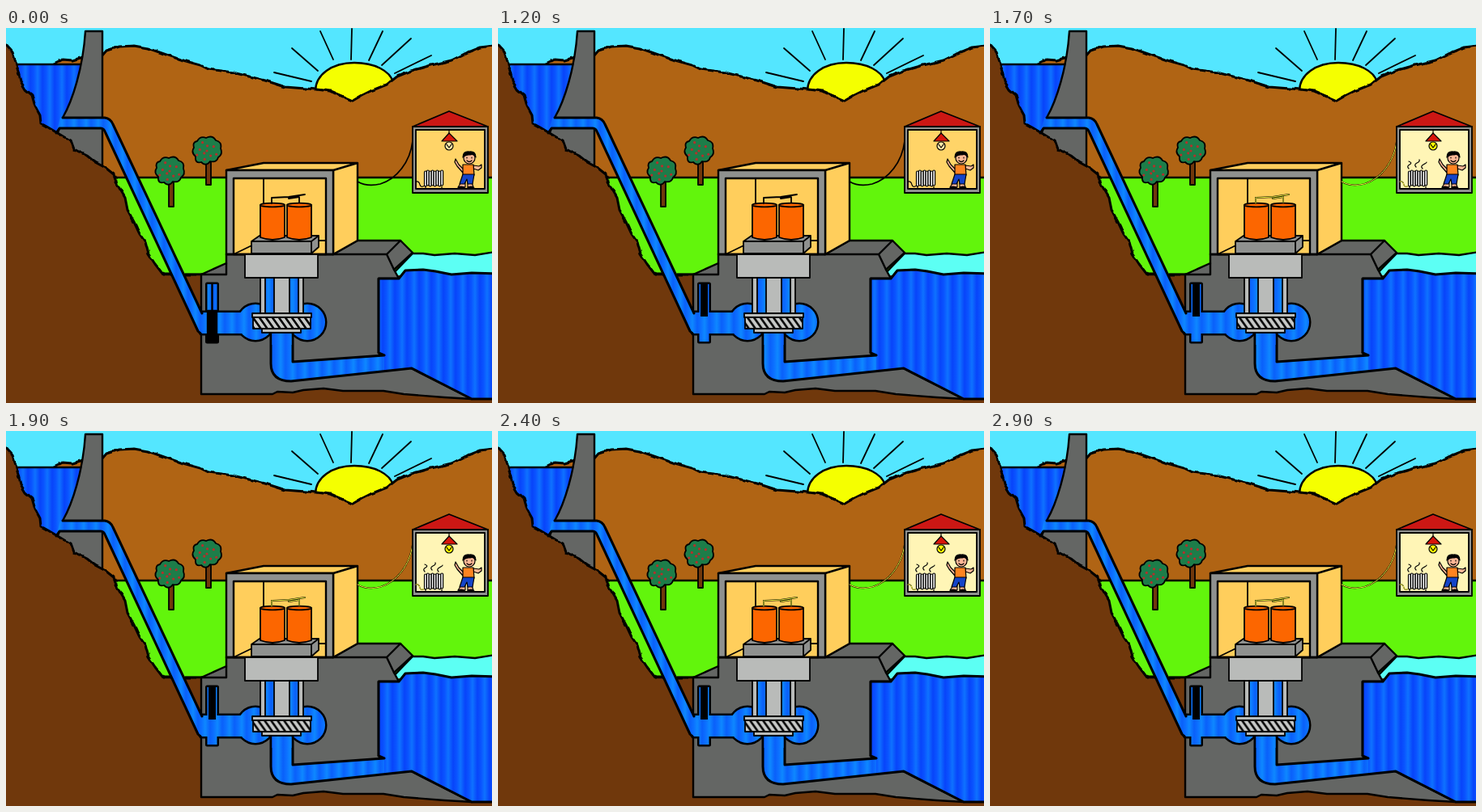
Recreate the animation shown at these times as an HTML page. Size 600x464 px, loop 3000 ms.

```html
<!DOCTYPE html>
<html lang="en">
<head>
<meta charset="utf-8">
<title>Hydroelectric power station</title>
<style>
  html, body { margin: 0; width: 100%; height: 100%; overflow: hidden; background: #54e6ff; }
  svg { display: block; width: 600px; height: 464px; stroke-linejoin: round; stroke-linecap: round; }
  .ink { stroke: #000; stroke-width: 2.4; }
  .line { stroke: #000; stroke-width: 2.4; fill: none; }
  .fine { stroke-width: 1.8; }
  .thin { stroke: #000; stroke-width: 1.2; }
  .bold { stroke-width: 3; }
  .rock { fill: #646664; }
  .steel { fill: #8f918f; }
  .pale { fill: #b9bbb9; }
  .wall { fill: #ffce5c; }
  .drum { fill: #fc6600; }
  .skin { fill: #ffb896; }
  .soil { fill: #70380c; }
  .room { fill: #ffd468; }
  .bulb { fill: #ffe9a8; }
  .live { stroke: #f2f23c; fill: none; visibility: hidden; }
  .steam { visibility: hidden; }
  .on .room { fill: #fff5b6; }
  .on .bulb { fill: #ffff00; }
  .on .live, .on .steam { visibility: visible; }
  .open .shut, .raised { visibility: hidden; }
  .open .raised { visibility: visible; }
</style>
</head>
<body>
<svg id="scene" viewBox="0 0 600 464">
  <defs>
    <linearGradient id="deep" gradientUnits="userSpaceOnUse" x1="0" x2="15" y1="0" y2="0" spreadMethod="repeat">
      <stop offset="0" stop-color="#0844fa"/>
      <stop offset=".3" stop-color="#0a54ff"/>
      <stop offset=".6" stop-color="#0e72ff"/>
      <stop offset="1" stop-color="#0844fa"/>
    </linearGradient>
    <linearGradient id="flow" gradientUnits="userSpaceOnUse" x1="0" x2="15" y1="0" y2="0" spreadMethod="repeat">
      <stop offset="0" stop-color="#0a60fa"/>
      <stop offset=".3" stop-color="#0c70ff"/>
      <stop offset=".6" stop-color="#0e88ff"/>
      <stop offset="1" stop-color="#0a60fa"/>
    </linearGradient>
    <pattern id="blades" width="8" height="15" y="358" patternUnits="userSpaceOnUse">
      <rect width="8" height="15" fill="#c8cac8"/>
      <path d="M-16 -1L-4 16M-8 -1L4 16M0 -1L12 16M8 -1L20 16" stroke="#000" stroke-width="2.6"/>
    </pattern>
    <filter id="rough" filterUnits="userSpaceOnUse" x="-20" y="-20" width="640" height="504" color-interpolation-filters="sRGB">
      <feTurbulence type="fractalNoise" baseFrequency=".1" seed="4"/>
      <feDisplacementMap in="SourceGraphic" scale="4" xChannelSelector="R" yChannelSelector="G"/>
    </filter>
    <g id="casing">
      <path d="M241 352H292V378H241ZM248.5 317H260.5V388H248.5Z"/>
      <circle cx="308" cy="364" r="22"/>
      <circle cx="372" cy="364" r="22"/>
    </g>
    <g id="drum" class="ink fine drum">
      <path d="M314 219V259Q329 265 344 259V219"/>
      <ellipse cx="329" cy="219" rx="15" ry="2.4"/>
    </g>
    <path id="crown" class="ink fine" fill="#1d7d49" d="M-12 -12Q-8 -19 -1 -16Q7 -20 11 -13Q19 -11 17 -3Q20 4 14 8Q12 15 4 13Q-1 20 -7 14Q-15 16 -14 7Q-20 2 -16 -4Q-18 -11 -12 -12Z"/>
    <path id="cable" d="M434 190Q446 197 462 193C482 187 499 166 502 140"/>
    <path id="leads" d="M328 217V210L349 209L369 206M349 211L362 209V216"/>
    <path id="plug" d="M506 190Q510 189 511 194Q512 198 517 195"/>
  </defs>

  <!-- Sky, sun and hills -->
  <rect width="600" height="464" fill="#54e6ff"/>
  <path class="line fine" d="M331 55L377 66M353 25L385 53M388 4L404 39M427 1L426 39M465 4L448 40M500 13L464 46M525 34L480 56"/>
  <path class="ink" fill="#f5ff00" d="M382 78C382 58 402 43 430 43C455 43 474 53 478 67L428 96Z"/>
  <g filter="url(#rough)">
    <path class="ink bold" fill="#b06414" d="M56 190V46L70 39L82 40L95 36L118 35L124 28L140 23L158 22L175 25L195 32L215 39L240 46L250 51L280 55L320 65L345 73L383 76L400 78L414 84L428 90L440 83L450 78L470 70L483 60L500 53L525 46L550 40L570 30L585 24L610 21V190Z"/>
  </g>
  <path class="ink" fill="#62f50c" d="M100 185H604V320H100Z"/>

  <!-- Far river -->
  <path class="ink" fill="#5cfff4" d="M470 312L502 279L515 279L529 281L554 279L579 281L604 277V320H470Z"/>

  <!-- Dam and reservoir -->
  <path fill="url(#deep)" d="M5 45H95L93 70L72 111L66 124L62 140L20 120Z"/>
  <path class="line" d="M12 45H93"/>
  <path class="ink rock" d="M98 4H119V176L60 140L66 124L70 111C82 90 95 50 98 4Z"/>

  <!-- Hillside -->
  <g filter="url(#rough)">
    <path class="ink bold soil" d="M-10 14L0 21L8 30L12 42L14 50L18 66L24 76L32 83L36 97L42 108L43 118L52 123L62 129L72 135L80 139L84 150L100 158L110 166L123 173L133 181L138 195L147 210L150 225L158 240L165 255L172 265L176 280L184 292L194 305H262V480H-10Z"/>
  </g>
  <path class="soil" d="M235 306H600V464H235Z"/>
  <path class="line" d="M194 305H272"/>

  <!-- Trees -->
  <g id="trees">
    <path class="ink fine soil" d="M201 190H207V221H201ZM247 165H253V194H247Z"/>
    <use href="#crown" x="202" y="177"/>
    <use href="#crown" x="248" y="152"/>
  </g>

  <!-- Concrete foundation -->
  <path class="ink rock" d="M241 305L272 291V280H404L434 263H487L502 278L479 299L485 310H460V402L500 421L575 459L541 457L491 453L466 449L416 449L392 446L367 448L354 451L335 450L329 453H241Z"/>
  <path class="line" d="M241 305H272V291M404 280H470L487 263M470 280L479 299"/>

  <!-- Tailrace -->
  <path fill="url(#deep)" d="M460 310H485L493 300L515 299L530 301L550 305L575 303L604 304V459H575L501 421L467 424V405L460 402Z"/>
  <path fill="url(#flow)" d="M327 374H354V413L467 405V424L352 437Q327 437 327 415Z"/>
  <path class="line bold" d="M467 405L460 402V310H485L493 300L515 299L530 301L550 305L575 303L604 304M604 459H575L501 421L352 437Q327 437 327 415V378M354 378V413L467 405"/>

  <!-- Turbine casing and sluice -->
  <use href="#casing" class="line" style="stroke-width:5"/>
  <use href="#casing" fill="url(#flow)"/>
  <path class="shut ink" d="M254.5 317V350M249 350H260V388H249Z"/>
  <path class="raised" d="M250 317H259V357H250Z"/>

  <!-- Penstock -->
  <path fill="url(#flow)" d="M67 111H122Q129 112 132 119L243 353V377.5L237 375L123 130Q121 124 117 124H66L62 130Z"/>
  <path class="line bold" d="M70 111H122Q129 112 132 119L242 353M62 130L66 124H117Q121 124 123 130L237 375L241 379"/>

  <!-- Turbine -->
  <path fill="url(#flow)" d="M328.5 375H352.5V392H328.5Z"/>
  <path class="ink fine pale" d="M314 309H367V354H314Z"/>
  <path class="ink fine" fill="url(#flow)" d="M320 309H331V354H320ZM350 309H361V354H350Z"/>
  <path class="ink fine pale" d="M304 353H377V358H304ZM316 372H364V377H316Z"/>
  <rect class="ink fine" x="305" y="358" width="71" height="14" fill="url(#blades)"/>

  <!-- Powerhouse -->
  <path class="ink wall" d="M272 176L318 167H434L404 176ZM404 176L434 167V263L404 280Z"/>
  <path class="ink steel" d="M272 176H404V280H272Z"/>
  <path class="ink wall" d="M281 186H395V280H281Z"/>
  <path class="line fine" d="M318 187V262L283 279M318 263H395"/>
  <path class="ink fine steel" d="M303 264L313 257H386V271L377 279H303ZM303 264H377V279M377 264L386 257"/>
  <path class="line" d="M272 280H404"/>
  <path class="ink fine pale" d="M295 280H385V309H295Z"/>
  <use href="#drum"/>
  <use href="#drum" x="33"/>
  <use href="#leads" class="line fine"/>
  <use href="#leads" class="live"/>

  <!-- House -->
  <use href="#cable" class="line fine"/>
  <use href="#cable" class="live"/>
  <path class="ink fine" fill="#cc1714" d="M502 122L547 103L595 122Z"/>
  <path class="ink fine steel" d="M502 122H595V204H502Z"/>
  <path class="ink fine room" d="M506 126H591V199H506Z"/>
  <path class="thin" d="M547 126V131"/>
  <circle class="thin bulb" cx="547" cy="146" r="5"/>
  <path class="thin" fill="none" d="M544 144L547 148L550 144"/>
  <path class="thin" fill="#d8160c" d="M538 140L547 130L557 140Z"/>
  <use href="#plug" class="thin" fill="none"/>
  <use href="#plug" class="live"/>
  <g id="radiator" class="thin" fill="#fff"></g>
  <path class="steam thin" fill="none" d="M517 174Q514 171 518 169T517 165M526 172Q523 169 527 167T530 163M534 174Q531 171 535 169T539 166"/>

  <!-- Child -->
  <g class="thin">
    <path class="skin" d="M565 175L559 169L555 162L554 166L557 171L564 179ZM577 170L584 171L587 169L587 173L583 176L577 174ZM562 191H567V197H558ZM570 191H575L577 197H570Z"/>
    <path fill="#ff8420" d="M564 169H577L578 182H564Z"/>
    <path fill="#1444c8" d="M564 181H578L576 193H570L569 187L566 193H560Z"/>
    <path d="M558 198Q559 195 566 197V199H558ZM570 199V197Q576 195 578 198V199Z"/>
    <circle class="skin" cx="572" cy="161" r="7"/>
    <path d="M564 160Q564 152 572 153Q580 152 580 160Q577 155 573 157Q568 156 564 160Z"/>
    <path fill="none" d="M569 160V161M575 160V161M569 164Q572 167 575 164"/>
  </g>
</svg>
<script>
  const scene = document.getElementById('scene');
  const byId = id => document.getElementById(id);
  const NS = 'http://www.w3.org/2000/svg';

  function add(parent, tag, attrs) {
    const node = document.createElementNS(NS, tag);
    for (const key in attrs) node.setAttribute(key, attrs[key]);
    parent.append(node);
  }

  // Fruit spread evenly through each crown
  for (const [x, y] of [[202, 177], [248, 152]]) {
    for (let i = 0; i < 10; i++) {
      const angle = i * 2.4, r = 4.4 * Math.sqrt(i);
      add(byId('trees'), 'circle', {
        cx: x + r * Math.cos(angle), cy: y + r * Math.sin(angle), r: 1.6, fill: '#b4302c'
      });
    }
  }

  for (let i = 0; i < 8; i++) {
    add(byId('radiator'), 'rect', {
      x: 516.5 + i * 2.9, y: 177 - (i % 2), width: 2.8, height: 19, rx: 1.4
    });
  }
  add(byId('radiator'), 'path', { d: 'M518 196V199M538 196V199' });

  const LOOP = 3000, STEP = 100, OPEN = 1000, POWER = 1300, CYCLE = 5;
  const STRIPE = 15, BLADE = 8;

  function draw() {
    const t = performance.now() % LOOP;
    const phase = t < OPEN ? 0 : Math.floor((t - OPEN) / STEP) % CYCLE / CYCLE;
    for (const id of ['deep', 'flow']) {
      byId(id).setAttribute('gradientTransform', `translate(${phase * STRIPE})`);
    }
    byId('blades').setAttribute('patternTransform', `translate(${phase * BLADE})`);
    scene.classList.toggle('open', t >= OPEN);
    scene.classList.toggle('on', t >= POWER);
    requestAnimationFrame(draw);
  }
  draw();
</script>
</body>
</html>
```
